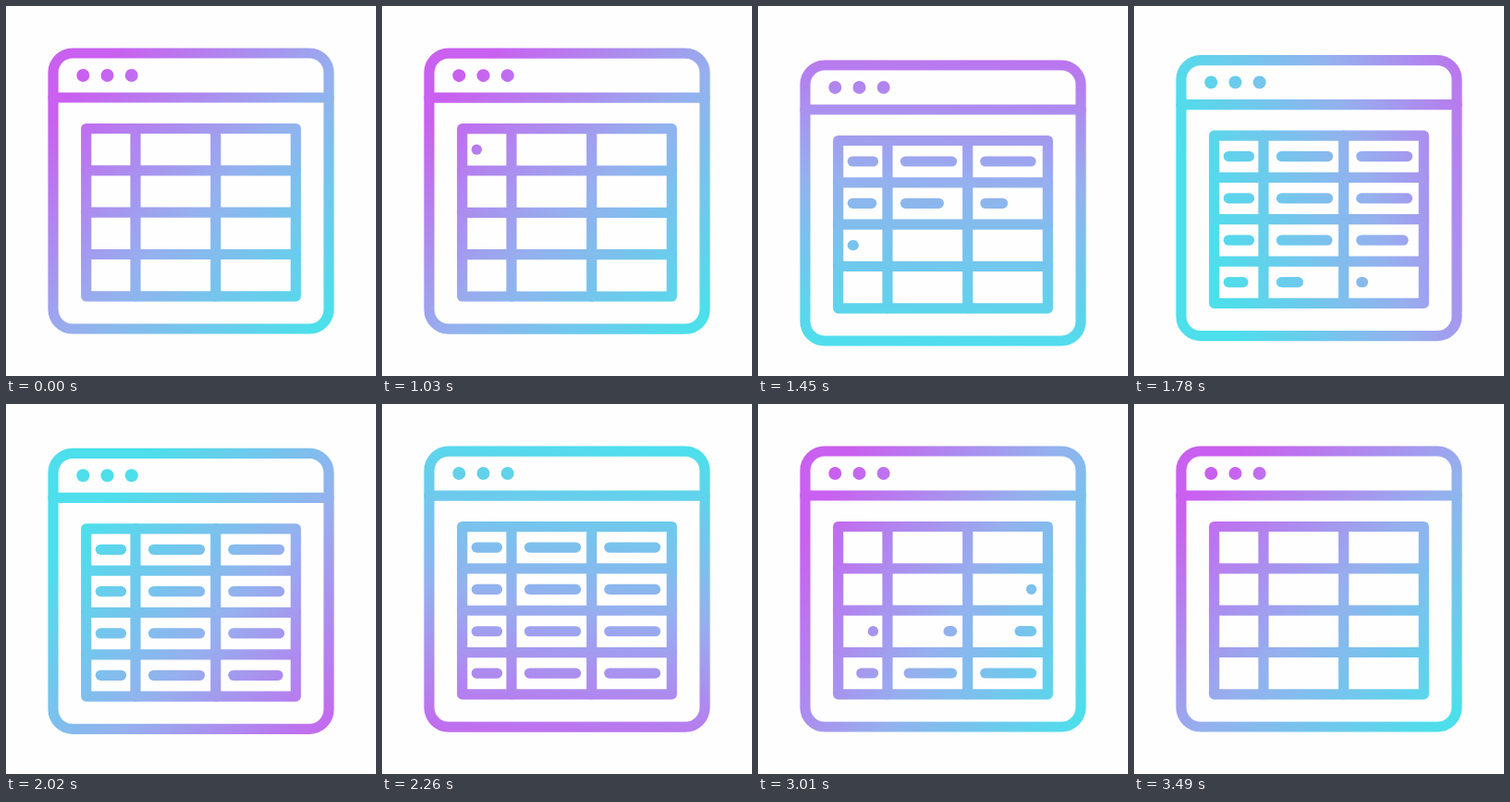
Animation, 400 px wide and 400 px high, one loop 3520 ms. Source, as an HTML page with a canvas:

```html
<!DOCTYPE html>
<html lang="en">
<head>
<meta charset="utf-8">
<title>Spreadsheet window</title>
<style>
  html, body { margin: 0; width: 100%; height: 100%; overflow: hidden; background: #fefefe; }
  canvas { display: block; width: 400px; height: 400px; }
</style>
</head>
<body>
<canvas id="stage"></canvas>
<script>
const LOOP = 3520;
const canvas = document.getElementById('stage');
const ctx = canvas.getContext('2d');
const dpr = window.devicePixelRatio || 1;
canvas.width = canvas.height = 400 * dpr;

const TAU = 2 * Math.PI;
const PITCH = 45.33;                                   // table row height
const COLS = [[102.3, 124.5], [159.5, 209.5], [245.8, 295.5]];  // bar ends
const ROW_GAP = 200, COL_GAP = 67, GROW = 390;
const SHOW = 1025, HIDE = 2310;

// Eased 0..1 progress of a span; a higher skew settles earlier.
function ease(t, from, length, skew = 1) {
  const u = Math.min(1, Math.max(0, (t - from) / length));
  const s = 1 - (1 - u) ** skew;
  return s * s * (3 - 2 * s);
}

// The window dips, then floats back up.
const drop = t => 13 * (ease(t, 1000, 460) - ease(t, 1460, 880, 1.3));

// The gradient makes one full turn while its middle sways along its axis.
function paint(t, dy) {
  const turn = ease(t, 1000, 2500, 1.3);
  const a = TAU * (turn + 5 / 8);
  const mid = 15 + 40 * Math.cos(TAU * (turn - .4));
  const at = d => [200 + d * Math.cos(a), 200 + d * Math.sin(a) - dy];
  const g = ctx.createLinearGradient(...at(mid + 182), ...at(mid - 182));
  g.addColorStop(0, 'rgb(201,96,239)');
  g.addColorStop(.5, 'rgb(149,176,238)');
  g.addColorStop(1, 'rgb(77,223,235)');
  return g;
}

function line(x1, y1, x2, y2) {
  ctx.beginPath();
  ctx.moveTo(x1, y1);
  ctx.lineTo(x2, y2);
  ctx.stroke();
}

function drawFrame() {
  ctx.beginPath();
  ctx.roundRect(51, 51, 298, 298, 21);
  ctx.stroke();
  line(51, 99, 349, 99);
  for (let i = 0; i < 3; i++) {
    ctx.beginPath();
    ctx.arc(83.3 + 26.2 * i, 75, 7, 0, TAU);
    ctx.fill();
  }
  ctx.strokeRect(86.7, 132.5, 226.6, 4 * PITCH);
  for (const x of [140, 226.7]) line(x, 132.5, x, 132.5 + 4 * PITCH);
  for (let r = 1; r < 4; r++) line(86.7, 132.5 + r * PITCH, 313.3, 132.5 + r * PITCH);
}

function drawBars(t) {
  for (let r = 0; r < 4; r++) {
    const y = 155 + r * PITCH;
    COLS.forEach(([x1, x2], c) => {
      const local = t - r * ROW_GAP - c * COL_GAP;
      if (local < SHOW || local >= HIDE + GROW) return;
      const end = from => x1 + (x2 - x1) * ease(local, from, GROW, 2);
      line(end(HIDE), y, end(SHOW) + .01, y);
    });
  }
}

function draw(t) {
  const dy = drop(t);
  ctx.setTransform(dpr, 0, 0, dpr, 0, 0);
  ctx.fillStyle = '#fefefe';
  ctx.fillRect(0, 0, 400, 400);
  ctx.translate(0, dy);
  ctx.fillStyle = ctx.strokeStyle = paint(t, dy);
  ctx.lineWidth = 11.2;
  ctx.lineCap = ctx.lineJoin = 'round';
  drawFrame();
  drawBars(t);
}

const start = performance.now();
function tick() {
  draw((performance.now() - start) % LOOP);
  requestAnimationFrame(tick);
}
tick();
</script>
</body>
</html>
```
